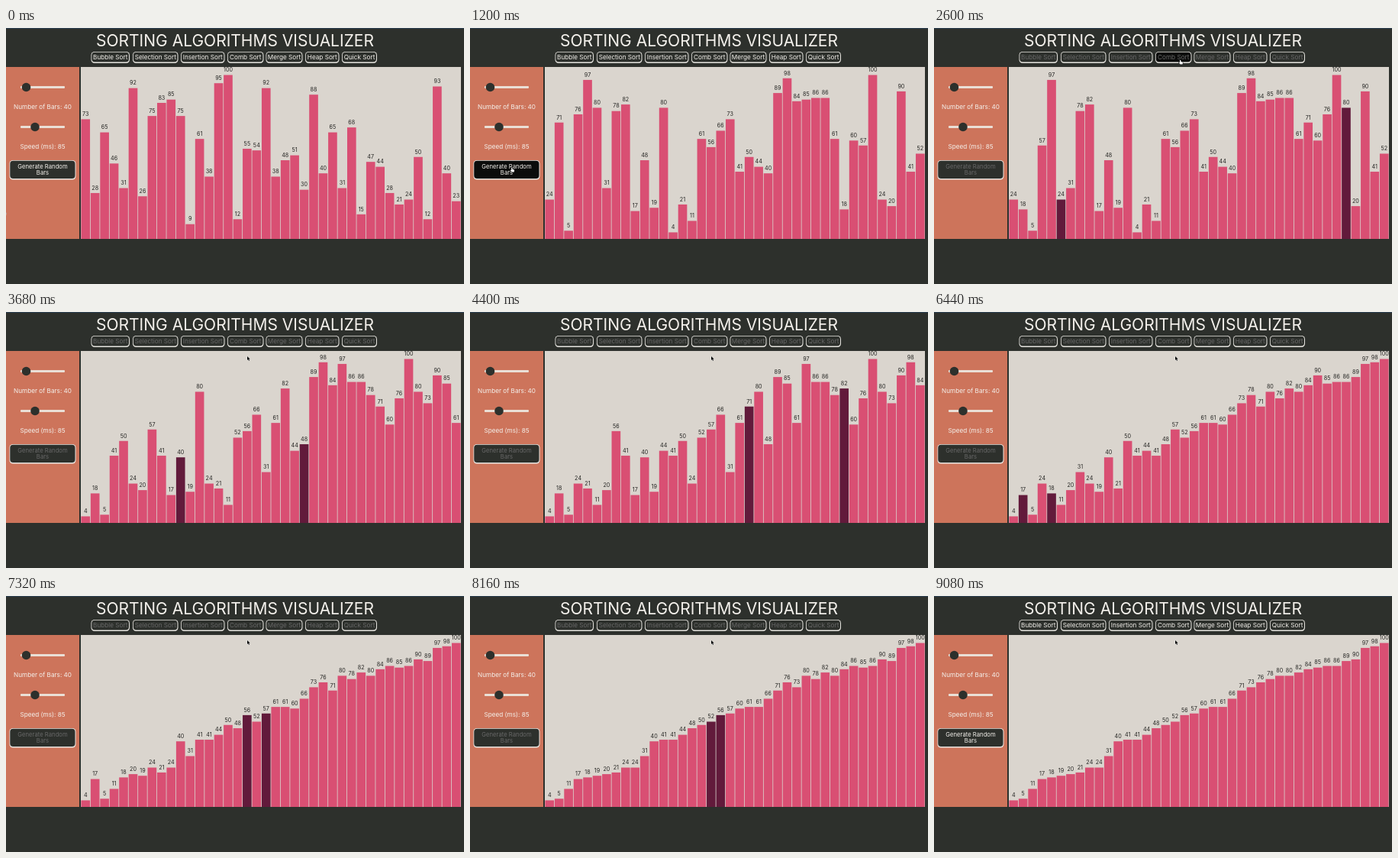
Animation of 600x335 px, one loop 9640 ms. Source, as an HTML page with a canvas:

```html
<!DOCTYPE html>
<html lang="en">
<head>
<meta charset="utf-8">
<title>Sorting Algorithms Visualizer</title>
<style>
  html, body { margin: 0; width: 100%; height: 100%; overflow: hidden; background: #2d302c; }
  canvas { display: block; width: 600px; height: 335px; }
</style>
</head>
<body>
<canvas id="stage" width="600" height="335"></canvas>
<script>
const ctx = document.getElementById('stage').getContext('2d');

const LOOP = 9640;
const SWAP_START = 2417, SWAP_TIME = 87.4;
const DISABLED_FROM = 2400, ENABLED_FROM = 8870, ENABLED_BY = 9070;
const SHUFFLES = [760, 1120];

const DARK = '#2d302c', PANEL = '#cd745b', PAPER = '#dad5ce';
const BAR = '#d94f73', ACTIVE = '#621a3b', LIGHT = '#f4f1ec';

const CHART = { x: 98, top: 51, bottom: 276, pitch: 12.45, unit: 2.145 };

const firstBars = [
  73, 28, 65, 46, 31, 92, 26, 75, 83, 85, 75, 9, 61, 38, 95, 100, 12, 55, 54, 92,
  38, 48, 51, 30, 88, 40, 65, 31, 68, 15, 47, 44, 28, 21, 24, 50, 12, 93, 40, 23];
const lastBars = [
  24, 71, 5, 76, 97, 80, 31, 78, 82, 17, 48, 19, 80, 4, 21, 11, 61, 56, 66, 73,
  41, 50, 44, 40, 89, 98, 84, 85, 86, 86, 61, 18, 60, 57, 100, 24, 20, 90, 41, 52];

function randomBars(seed) {
  return firstBars.map(() => {
    seed = (seed * 16807) % 2147483647;
    return 4 + seed % 97;
  });
}
const middleBars = randomBars(4242);

// Every swap of a comb sort, with the bars as they stand after it.
function combSort(source) {
  const bars = source.slice(), steps = [];
  let gap = bars.length, swapped = true;
  while (gap > 1 || swapped) {
    gap = Math.max(1, Math.floor(gap / 1.3));
    swapped = false;
    for (let i = 0; i + gap < bars.length; i++) {
      const j = i + gap;
      if (bars[i] <= bars[j]) continue;
      [bars[i], bars[j]] = [bars[j], bars[i]];
      swapped = true;
      steps.push({ bars: bars.slice(), active: [i, j] });
    }
  }
  return steps;
}
const steps = combSort(lastBars);
const sorted = steps[steps.length - 1].bars;

const button = (x, right, label) => ({ x, y: 31, w: right - x, h: 15, lines: [label], size: 8.2 });
const buttons = [
  button(111.5, 162, 'Bubble Sort'),
  button(166, 225.5, 'Selection Sort'),
  button(229, 286.5, 'Insertion Sort'),
  button(290, 337.5, 'Comb Sort'),
  button(340.5, 388.5, 'Merge Sort'),
  button(392, 436.5, 'Heap Sort'),
  button(440, 486, 'Quick Sort'),
  { x: 4.5, y: 173, w: 87, h: 25.5, lines: ['Generate Random', 'Bars'], size: 7.7 }
];

// Pointer stops: time, x, y.
const route = [
  [0, -3, 239], [640, 50, 186], [1160, 52, 184], [1520, 112, 150],
  [1720, 112, 150], [2320, 322, 42], [2760, 322, 42], [3480, 316, 58]];

const clamp = v => Math.max(0, Math.min(1, v));
const ease = v => v * v * (3 - 2 * v);

function pointerAt(t) {
  let k = 0;
  while (k < route.length - 2 && t >= route[k + 1][0]) k++;
  const [t0, x0, y0] = route[k], [t1, x1, y1] = route[k + 1];
  const p = ease(clamp((t - t0) / (t1 - t0)));
  return { x: x0 + (x1 - x0) * p, y: y0 + (y1 - y0) * p };
}

function sceneAt(t) {
  if (t < SHUFFLES[0]) return { bars: firstBars, active: [] };
  if (t < SHUFFLES[1]) return { bars: middleBars, active: [] };
  if (t < SWAP_START) return { bars: lastBars, active: [] };
  return steps[Math.floor((t - SWAP_START) / SWAP_TIME)] || { bars: sorted, active: [] };
}

function rect(x, y, w, h, color) {
  ctx.fillStyle = color;
  ctx.fillRect(x, y, w, h);
}

function roundRect(x, y, w, h, r, color) {
  ctx.fillStyle = color;
  ctx.beginPath();
  ctx.roundRect(x, y, w, h, r);
  ctx.fill();
}

function text(str, x, baseline, size, color) {
  ctx.font = `${size}px Inter, sans-serif`;
  ctx.textAlign = 'center';
  ctx.fillStyle = color;
  ctx.fillText(str, x, baseline);
}

function drawSlider(y, thumb, label) {
  roundRect(19, y - 1.5, 58, 3, 1, '#eadfd6');
  ctx.fillStyle = DARK;
  ctx.beginPath();
  ctx.arc(thumb, y, 5.8, 0, Math.PI * 2);
  ctx.fill();
  text(label, 48, y + 28.5, 8.2, LIGHT);
}

const isOver = (b, p) => p.x > b.x && p.x < b.x + b.w && p.y > b.y && p.y < b.y + b.h;

function drawButton(b, hovered, enabled) {
  const shade = v => Math.round(104 + (v - 104) * enabled);
  roundRect(b.x, b.y, b.w, b.h, 4.5, '#e6e4df');
  roundRect(b.x + 0.8, b.y + 0.7, b.w - 1.8, b.h - 2.2, 4, hovered ? '#0b0c0b' : DARK);
  const middle = b.y + b.h / 2 + 2.4 - (b.lines.length - 1) * 4;
  b.lines.forEach((line, i) =>
    text(line, b.x + b.w / 2, middle + i * 8, b.size, `rgb(${shade(244)},${shade(241)},${shade(236)})`));
}

function drawBars({ bars, active }) {
  bars.forEach((value, i) => {
    const x = CHART.x + i * CHART.pitch, h = value * CHART.unit;
    const top = CHART.bottom - h;
    rect(x + 0.4, top, CHART.pitch - 0.8, h, active.includes(i) ? ACTIVE : BAR);
    text(value, x + CHART.pitch / 2, top - 4.2, 7.2, '#252523');
  });
}

function drawPointer({ x, y }, isHand) {
  const shape = isHand
    ? [[0, 0], [1.2, 0], [1.4, 2], [4, 2.8], [3.6, 5.6], [0.6, 5.6], [-1.6, 3], [0, 3.2]]
    : [[0, 0], [0, 5], [1.2, 4], [2.1, 5.9], [3, 5.5], [2.2, 3.7], [3.7, 3.6]];
  ctx.beginPath();
  shape.forEach(([dx, dy]) => ctx.lineTo(x + dx, y + dy));
  ctx.closePath();
  ctx.lineJoin = 'round';
  ctx.lineWidth = 1;
  ctx.strokeStyle = isHand ? '#111' : '#f2f2f2';
  ctx.stroke();
  ctx.fillStyle = isHand ? '#fff' : '#0a0a0a';
  ctx.fill();
}

function draw(now) {
  const t = now % LOOP;
  const pointer = pointerAt(t);
  const enabled = t < DISABLED_FROM ? 1 : clamp((t - ENABLED_FROM) / (ENABLED_BY - ENABLED_FROM));

  rect(0, 0, 600, 335, DARK);
  rect(0, 0, 600, 1, '#2c4052');
  text('SORTING ALGORITHMS VISUALIZER', 300, 24.3, 21, LIGHT);

  rect(0, 51, 96, 225, PANEL);
  rect(CHART.x, CHART.top, 498, CHART.bottom - CHART.top, PAPER);
  drawSlider(77.5, 26.5, 'Number of Bars: 40');
  drawSlider(129.5, 38, 'Speed (ms): 85');

  buttons.forEach(b => drawButton(b, isOver(b, pointer), enabled));
  drawBars(sceneAt(t));
  drawPointer(pointer, buttons.some(b => isOver(b, pointer)));

  requestAnimationFrame(draw);
}
requestAnimationFrame(draw);
</script>
</body>
</html>
```
